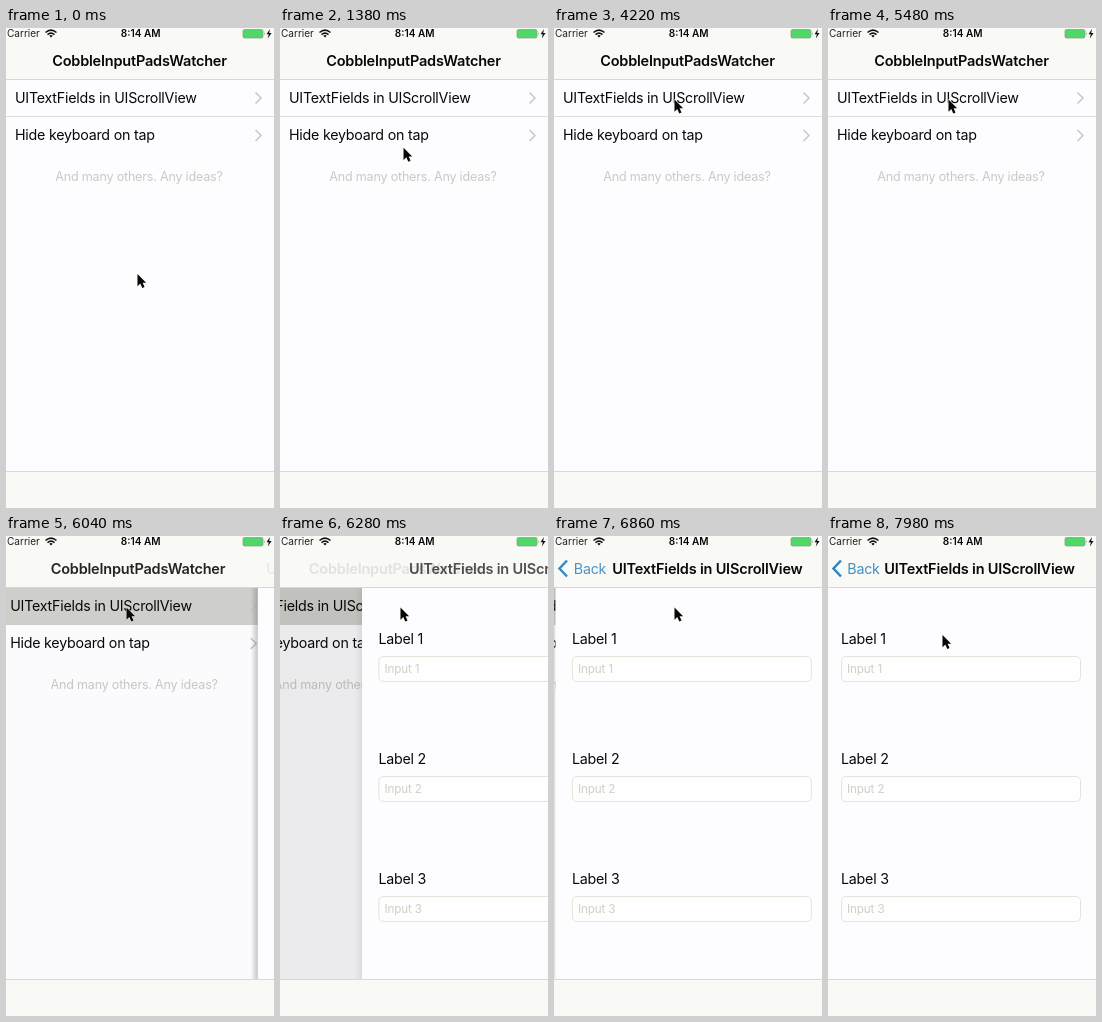
These frames come from a looping animation (268x480 px, 8 s). An HTML page:

```html
<!DOCTYPE html>
<html lang="en">
<head>
<meta charset="utf-8">
<title>Push transition</title>
<style>
  html, body { margin: 0; width: 100%; height: 100%; overflow: hidden; background: #fdfdff; }
  svg { display: block; width: 268px; height: 480px; }
  text { font: 14.24px Inter, sans-serif; letter-spacing: -.23px; fill: #080808; white-space: pre; }
  .title { font-size: 14.5px; font-weight: 600; letter-spacing: -.2px; }
  .status { font-size: 10.05px; letter-spacing: 0; fill: #222; }
  .time { font-weight: 600; text-anchor: middle; fill: #080808; }
  .hint { font-size: 12.56px; letter-spacing: -.2px; fill: #cac9c4; text-anchor: middle; }
  .input { font-size: 11.7px; letter-spacing: -.13px; fill: #d0d0c8; }
  .field { fill: #fefefe; stroke: #e4e4da; }
  .bar { fill: #f9f9f6; }
  .line { fill: #d8d8d4; }
  .arrow { fill: none; stroke: #c7c7c6; stroke-width: 1.5; }
  .back { fill: #3f91c6; }
</style>
</head>
<body>
<svg viewBox="0 0 268 480">
  <defs>
    <linearGradient id="fade">
      <stop offset="0" stop-color="#555" stop-opacity="0"/>
      <stop offset="1" stop-color="#555" stop-opacity=".35"/>
    </linearGradient>
  </defs>
  <rect width="268" height="480" fill="#fdfdff"/>

  <g id="list">
    <rect class="line" y="88" width="268" height="1" opacity=".8"/>
    <rect id="press" y="52" width="268" height="37" fill="#d0d0cc"/>
    <text x="9" y="75">UITextFields in UIScrollView</text>
    <text x="9" y="112">Hide keyboard on tap</text>
    <path class="arrow" d="M249.5 64.5l5.5 5.5l-5.5 5.5M249.5 102l5.5 5.5l-5.5 5.5"/>
    <text class="hint" x="133" y="153">And many others. Any ideas?</text>
  </g>
  <rect id="dim" y="51" width="268" height="393"/>

  <g id="page">
    <rect id="shade" x="-7" y="51" width="7" height="393" fill="url(#fade)"/>
    <rect y="51" width="268" height="393" fill="#fdfdff"/>
    <g id="form"></g>
  </g>

  <rect class="bar" width="268" height="51"/>
  <rect class="line" y="51" width="268" height="1"/>
  <rect class="bar" y="444" width="268" height="36"/>
  <rect class="line" y="443" width="268" height="1"/>

  <g id="oldTitle"><text class="title" x="133.5" y="38" text-anchor="middle">CobbleInputPadsWatcher</text></g>
  <g id="newTitle"><text class="title" x="56.3" y="38">UITextFields in UIScrollView</text></g>
  <path id="chevron" d="M13 24.5L5.5 32.5L13 40.5" fill="none" stroke="#2d86c2" stroke-width="2.5"/>
  <g id="back"><text class="back" x="19.3" y="38">Back</text></g>

  <text class="status" x="1" y="9.3">Carrier</text>
  <g fill="none" stroke="#111" stroke-width="1.5">
    <path d="M39.5 4.5Q45 -.3 50.5 4.5M41.5 6.6Q45 3.7 48.5 6.6"/>
    <path d="M43.3 7.7L45 9.6L46.7 7.7Q45 6.5 43.3 7.7Z" fill="#111" stroke="none"/>
  </g>
  <text class="status time" x="134.7" y="9.3">8:14 AM</text>
  <rect x="237" y="1.5" width="20" height="8.5" rx="1.6" fill="#4fd768" stroke="#8f9f8a" stroke-width=".8"/>
  <path d="M258.3 4.2q1.4 1.5 0 3z" fill="#777"/>
  <path d="M264 1L260.5 6.2H262.8L261.8 10.5L265.6 4.9H263.2Z" fill="#111"/>

  <path id="cursor" d="M0 0V12.2L2.8 9.6L4.8 14L7 13L5.1 8.8H8.6Z" fill="#080808" stroke="#f4f4e8" stroke-width=".8" paint-order="stroke"/>
</svg>
<script>
const LOOP = 8000;
const PRESS = 5800, PUSH = 5994, SETTLE = 7000;
const STIFF = 0.0084;
const MARGIN_SHIFT = 3.35; // wider margin until the push settles

// time, x, y of the pointer tip
const PATH = [
  [0, 131.5, 246], [60, 131.5, 246], [2300, 120.5, 71.5],
  [7250, 120.5, 71.5], [7960, 114.5, 99], [LOOP, 114.5, 99]
];

const $ = id => document.getElementById(id);
const [list, press, dim, page, shade, form, oldTitle, newTitle, chevron, back, cursor] =
  ['list', 'press', 'dim', 'page', 'shade', 'form', 'oldTitle', 'newTitle', 'chevron', 'back', 'cursor'].map($);

form.innerHTML = [1, 2, 3].map(n => {
  const y = n * 120;
  return `<text x="13" y="${y - 12}">Label ${n}</text>
    <rect class="field" x="13.5" y="${y + .5}" width="239" height="25" rx="4.5"/>
    <text class="input" x="19" y="${y + 17}">Input ${n}</text>`;
}).join('');

const move = (el, x, y = 0) => el.setAttribute('transform', `translate(${x.toFixed(2)} ${y.toFixed(2)})`);
const show = (el, a) => el.setAttribute('opacity', Math.max(0, Math.min(1, a)).toFixed(3));
const ease = u => u < .5 ? 4 * u ** 3 : 1 - 4 * (1 - u) ** 3;

// Critically damped spring: 1 before the push, 0 once settled
function remaining(t) {
  if (t <= PUSH) return 1;
  if (t >= SETTLE) return 0;
  const s = STIFF * (t - PUSH);
  return (1 + s) * Math.exp(-s);
}

function pointer(t) {
  const i = Math.max(1, PATH.findIndex(p => p[0] > t));
  const [t0, x0, y0] = PATH[i - 1], [t1, x1, y1] = PATH[i];
  const k = ease((t - t0) / (t1 - t0));
  return [x0 + (x1 - x0) * k, y0 + (y1 - y0) * k];
}

function render(t) {
  const r = remaining(t), done = 1 - r;
  move(page, 268 * r);
  move(list, -80 * done);
  move(form, t < SETTLE ? MARGIN_SHIFT : 0);
  show(press, t >= PRESS ? 1 : 0);
  show(dim, .1 * done);
  show(shade, t > PUSH ? r : 0);
  move(oldTitle, -25 * done);
  show(oldTitle, r * r);
  move(newTitle, 216 * r ** .92);
  show(newTitle, done);
  move(back, 100 * r);
  show(back, 1 - 8 * r);
  show(chevron, 1 - 8 * r);
  move(cursor, ...pointer(t));
}

const start = performance.now();
function tick() {
  render((performance.now() - start) % LOOP);
  requestAnimationFrame(tick);
}
tick();
</script>
</body>
</html>
```
